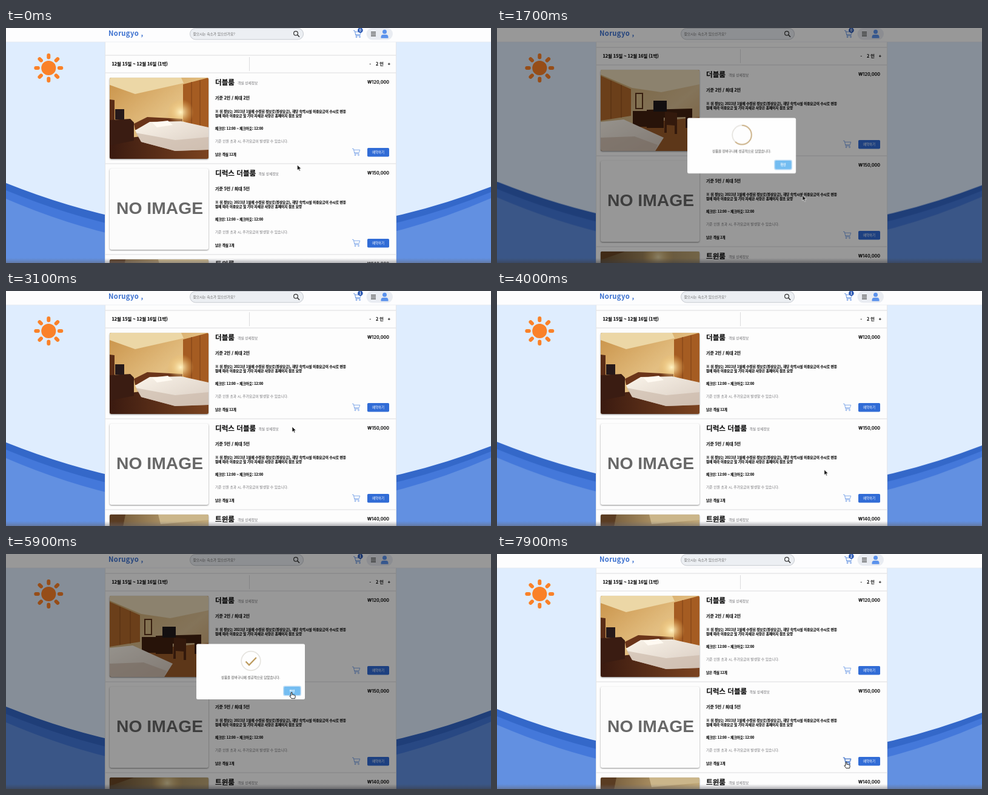
Write an HTML page that moves like this. It is 800x388 px and loops after 8000 ms.

```html
<!DOCTYPE html>
<html lang="ko">
<head>
<meta charset="utf-8">
<title>객실 예약</title>
<style>
html, body { margin: 0; width: 100%; height: 100%; overflow: hidden; background: #dfedfe; }
svg { display: block; }
#stage { width: 800px; height: 388px; font-family: "Noto Sans CJK KR", "Noto Sans CJK", "Noto Sans", sans-serif; }
text { white-space: pre; }
.b { font-weight: 700; }
.m { font-weight: 500; }
.heavy { font-weight: 700; stroke: #151515; stroke-width: .2px; }
.price { font-family: Inter, "Noto Sans CJK KR", sans-serif; font-weight: 700; text-anchor: end; }
.mid { text-anchor: middle; }
.line { stroke: #dcdcde; fill: none; }
.shadow { filter: drop-shadow(0 1px 1px rgba(0,0,0,.45)); }

.waves, .scroll, .second, .hover, .dim, .modal, .ring, .tick, .cursor, .arrow, .hand, .n0, .n1, .n2 {
  animation: 8s linear infinite;
}
.waves { animation-name: waves; animation-timing-function: ease-in-out; }
@keyframes waves { 0%, 100% { transform: translateY(4px); } 52% { transform: translateY(-3px); } }

.scroll { animation-name: scroll; }
@keyframes scroll {
  0%, 2% { transform: translateY(13px); animation-timing-function: ease-out; }
  6%, 100% { transform: translateY(0); }
}
.second { animation-name: second; }
@keyframes second {
  0%, 3.75% { opacity: 0; } 8%, 28.75% { opacity: 1; }
  33%, 53.75% { opacity: 0; } 58%, 77% { opacity: 1; } 81%, 100% { opacity: 0; }
}
.hover { animation-name: hover; animation-timing-function: step-end; }
@keyframes hover {
  0% { opacity: 0; } 12.5% { opacity: 1; } 18% { opacity: 0; }
  53% { opacity: 1; } 63.5% { opacity: 0; } 94.5%, 100% { opacity: 1; }
}
.dim { animation-name: dim; }
@keyframes dim {
  0%, 17.5% { opacity: 0; } 20%, 31.25% { opacity: 1; } 33.75%, 62.5% { opacity: 0; }
  65%, 76.9% { opacity: 1; } 79.4%, 100% { opacity: 0; }
}
.modal { animation-name: modal; transform-origin: 404px 194px; }
@keyframes modal {
  0%, 17.5% { transform: scale(.5); } 19.5% { transform: scale(1.04); } 20.5%, 31.25% { transform: scale(1); }
  33.75%, 62.5% { transform: scale(.5); } 64.5% { transform: scale(1.04); } 65.5%, 76.9% { transform: scale(1); }
  79.4%, 100% { transform: scale(.5); }
}
.ring { stroke-dasharray: 100; animation-name: ring; }
@keyframes ring {
  0%, 18.4% { stroke-dashoffset: 100; opacity: 1; } 23% { stroke-dashoffset: 0; opacity: 1; }
  27%, 40% { stroke-dashoffset: 0; opacity: 0; } 40.1%, 63.4% { stroke-dashoffset: 100; opacity: 1; }
  68% { stroke-dashoffset: 0; opacity: 1; } 72%, 100% { stroke-dashoffset: 0; opacity: 0; }
}
.tick { stroke-dasharray: 100 110; animation-name: tick; }
@keyframes tick {
  0%, 22.5% { stroke-dashoffset: 105; } 27.5%, 40% { stroke-dashoffset: 0; }
  40.1%, 67.5% { stroke-dashoffset: 105; } 72.5%, 100% { stroke-dashoffset: 0; }
}
.cursor { animation-name: cursor; animation-timing-function: ease-in-out; }
@keyframes cursor {
  0%, 4% { transform: translate(480.5px, 226px); }
  12.5%, 17.9% { transform: translate(577px, 342px); animation-timing-function: linear; }
  21.25% { transform: translate(504px, 276.5px); animation-timing-function: ease-out; }
  24.5%, 33% { transform: translate(471px, 228px); }
  38.75%, 45% { transform: translate(472px, 224px); }
  53.75%, 60% { transform: translate(580.5px, 337.5px); }
  64.4% { transform: translate(577px, 340px); }
  70%, 78% { transform: translate(471px, 228px); }
  83.75%, 88% { transform: translate(471px, 228.5px); }
  95%, 100% { transform: translate(576px, 343px); }
}
.arrow, .hand { animation-timing-function: step-end; }
.arrow { animation-name: arrow; }
.hand { animation-name: hand; }
@keyframes arrow {
  0% { opacity: 1; } 12.5% { opacity: 0; } 18% { opacity: 1; } 24.4% { opacity: 0; } 33% { opacity: 1; }
  60.6% { opacity: 0; } 65% { opacity: 1; } 69.5% { opacity: 0; } 78% { opacity: 1; } 94.5%, 100% { opacity: 0; }
}
@keyframes hand {
  0% { opacity: 0; } 12.5% { opacity: 1; } 18% { opacity: 0; } 24.4% { opacity: 1; } 33% { opacity: 0; }
  60.6% { opacity: 1; } 65% { opacity: 0; } 69.5% { opacity: 1; } 78% { opacity: 0; } 94.5%, 100% { opacity: 1; }
}
.n0, .n1, .n2 { animation-timing-function: step-end; }
.n0 { animation-name: n0; }
.n1 { animation-name: n1; }
.n2 { animation-name: n2; }
@keyframes n0 { 0% { opacity: 1; } 32%, 100% { opacity: 0; } }
@keyframes n1 { 0% { opacity: 0; } 32% { opacity: 1; } 78%, 100% { opacity: 0; } }
@keyframes n2 { 0% { opacity: 0; } 78%, 100% { opacity: 1; } }
</style>
</head>
<body>
<svg id="stage" viewBox="0 0 800 388">
  <defs>
    <linearGradient id="wall" x2="1" y2="1"><stop stop-color="#c99248"/><stop offset=".5" stop-color="#e3bf82"/><stop offset="1" stop-color="#cf9f5c"/></linearGradient>
    <linearGradient id="pale" x2="1" y2="1"><stop stop-color="#c9a366"/><stop offset=".6" stop-color="#dcc195"/><stop offset="1" stop-color="#c79a63"/></linearGradient>
    <linearGradient id="floor" x2="1"><stop stop-color="#3a1a10"/><stop offset="1" stop-color="#7b4320"/></linearGradient>
    <linearGradient id="sheet" x2="1" y2="1"><stop stop-color="#faf4ea"/><stop offset="1" stop-color="#d8cbc0"/></linearGradient>
    <linearGradient id="dusk" x2="1"><stop stop-color="#6b5234"/><stop offset=".5" stop-color="#a48a5e"/><stop offset="1" stop-color="#c0a878"/></linearGradient>
    <linearGradient id="foot" x2="0" y2="1"><stop stop-color="#707078" stop-opacity="0"/><stop offset="1" stop-color="#606068" stop-opacity=".5"/></linearGradient>
    <radialGradient id="glow"><stop stop-color="#fff3c4"/><stop offset="1" stop-color="#f0b95c" stop-opacity="0"/></radialGradient>
    <clipPath id="card"><rect width="163" height="134" rx="3"/></clipPath>

    <symbol id="cart" viewBox="0 0 14 13" overflow="visible">
      <path d="M.5 .8H2.6L4.6 9H12M3.1 2.8H13.2L11.8 7.2H4.2" fill="none" stroke="currentColor" stroke-width=".85" stroke-linejoin="round"/>
      <circle cx="5.6" cy="11.2" r="1" fill="none" stroke="currentColor" stroke-width=".8"/><circle cx="11" cy="11.2" r="1" fill="none" stroke="currentColor" stroke-width=".8"/>
    </symbol>

    <g id="bedroom">
      <path d="M0 0H163V134H0Z" fill="url(#wall)"/>
      <path d="M0 0H118L122 9L42 27L0 12Z" fill="#ecd7a6"/>
      <path d="M121 11L163 0V88L121 72Z" fill="#a55c22"/>
      <path d="M135 7V77M149 4V82" stroke="#7d3f14"/>
      <path d="M0 103L60 96L163 112V134H0Z" fill="url(#floor)"/>
      <path d="M0 36L8 37V75H0Z" fill="#5b2d16"/>
      <path d="M0 70L34 68L40 74V104L0 112Z" fill="#3a1c12"/>
      <path d="M9 52H24V69H9Z" fill="#26191a"/>
      <path d="M40 76L62 65L120 68V86H42Z" fill="#6a3419"/>
      <circle cx="117" cy="57" r="22" fill="url(#glow)"/>
      <path d="M42 87L66 73L118 72L163 82V119L108 121L52 106Z" fill="url(#sheet)"/>
      <path d="M70 74L96 71L104 78L78 82Z" fill="#fffaf2"/>
      <path d="M43 91L108 103L163 98V119L108 121L52 106Z" fill="#cbb9aa" opacity=".65"/>
    </g>
    <g id="study">
      <path d="M0 0H163V134H0Z" fill="url(#pale)"/>
      <path d="M0 0H163V24L100 37L52 30L0 8Z" fill="#e9d9b8"/>
      <path d="M0 10L50 32V76L0 84Z" fill="#b26a2c"/>
      <path d="M17 18V81M34 25V79" stroke="#8a4a1b"/>
      <path d="M46 90L163 78V134H46Z" fill="#9c5c2b"/>
      <path d="M58 39H69V64H58Z" fill="#d9bd88" stroke="#5d321a" stroke-width="2"/>
      <path d="M53 68H78V94H53ZM76 66L151 64V96H140V78L104 79V96H76Z" fill="#42200f"/>
      <path d="M87 51H109V69H87Z" fill="#211a1b"/>
      <path d="M106 69L126 71V106H122V92L109 91V104H105Z" fill="#552a15"/>
      <path d="M0 86L38 82L104 112L90 134H0Z" fill="url(#sheet)"/>
      <path d="M0 112L56 110L94 124L90 134H0Z" fill="#c9b4a4" opacity=".65"/>
    </g>
    <g id="twinA"><path d="M0 0H163V134H0Z" fill="url(#dusk)"/><path d="M0 0H26L20 30H0Z" fill="#5a3c22"/><path d="M80 0H163V9L84 16Z" fill="#cbb68a"/></g>
    <g id="twinB"><path d="M0 0H163V134H0Z" fill="url(#dusk)"/><path d="M0 0H40L0 14Z" fill="#6b4726"/><circle cx="95" cy="9" r="26" fill="url(#glow)" opacity=".7"/></g>
  </defs>

  <path d="M0 0H800V388H0Z" fill="#dfedfe"/>
  <g class="waves">
    <path d="M0 252Q400 412 800 258V410H0Z" fill="#3468c9"/>
    <path d="M0 264Q400 429 800 267V410H0Z" fill="#4478da"/>
    <path d="M0 278Q400 450 800 277V410H0Z" fill="#6290e1"/>
  </g>
  <g id="sun" fill="#fa8128"><circle cx="70.3" cy="66" r="12.1"/></g>

  <path d="M163.5 0H643.5V389H163.5Z" fill="#fdfdfd" stroke="#e3e6ea"/>
  <g class="scroll">
    <path class="line" d="M164 32H643M164 61H643M401.5 35V58"/>
    <text class="heavy" x="174.5" y="49.2" font-size="7.3">12월 15일 ~ 12월 16일 (1박)</text>
    <text class="heavy" x="599.5" y="48.5" font-size="7">-</text>
    <text class="b" x="610" y="48.5" font-size="7.2">2 인</text>
    <text class="heavy" x="629.7" y="48.5" font-size="7">+</text>
    <g id="rooms"></g>
  </g>

  <path d="M0 0H800V23H0Z" fill="#fdfdfe"/>
  <path d="M0 23H800" stroke="#e6e9ee" stroke-width=".7"/>
  <text class="b" x="169" y="13" font-size="11.3" letter-spacing=".3" fill="#3b70cf">Norugyo ,</text>
  <rect x="303.5" y=".5" width="187" height="18.5" rx="9.2" fill="#eceff3" stroke="#b9bdc5" stroke-width=".8"/>
  <text x="308.5" y="11.7" font-size="5.75" fill="#666">찾으시는 숙소가 있으신가요?</text>
  <g fill="none" stroke="#333"><circle cx="478" cy="8.7" r="3.4" stroke-width="1.2"/><path d="M480.6 11.3L484 14.7" stroke-width="1.6"/></g>
  <use href="#cart" x="572.5" y="3.5" width="14" height="13" color="#4d83dd"/>
  <circle cx="584.4" cy="3.8" r="4.3" fill="#2c59b4"/>
  <g class="b mid" font-size="5.5" fill="#fff">
    <text class="n0" x="584.4" y="5.8">0</text><text class="n1" x="584.4" y="5.8">1</text><text class="n2" x="584.4" y="5.8">2</text>
  </g>
  <rect x="594.5" y="0" width="43.5" height="19.5" rx="9.7" fill="#e9ecf2"/>
  <path d="M602 6.9H610M602 9.9H610M602 12.9H610" stroke="#333" stroke-width="1.1"/>
  <path d="M618.5 16.8V14.8Q618.5 11 622 11H627Q630.5 11 630.5 14.8V16.8Z" fill="#5b92ec"/><circle cx="624.5" cy="6.2" r="3.5" fill="#5b92ec"/>
  <path d="M0 380H800V388H0Z" fill="url(#foot)"/>

  <g class="dim">
    <path d="M0 0H800V388H0Z" opacity=".4"/>
    <g class="modal">
      <rect x="314" y="148.5" width="179" height="91.5" rx="2.5" fill="#fefefe"/>
      <g fill="none">
        <circle cx="404" cy="176.5" r="15.8" stroke="#e6e4df" stroke-width="1.7"/>
        <circle class="ring" cx="404" cy="176.5" r="15.8" pathLength="100" stroke="#c9ab7c" stroke-width="1.7" transform="rotate(-90 404 176.5)"/>
        <path class="tick" d="M395.5 177.5L401 183.3L412.8 171" pathLength="100" stroke="#bd9c60" stroke-width="2.4"/>
      </g>
      <text class="mid" x="403.5" y="205.6" font-size="5.5" fill="#444">상품을 장바구니에 성공적으로 담았습니다.</text>
      <rect x="457" y="217.5" width="30" height="17" rx="3" fill="#c3dff5"/>
      <rect x="458.5" y="219" width="27" height="14" rx="2" fill="#74bdf1"/>
      <text class="b mid" x="472" y="227.9" font-size="5" fill="#fff">확인</text>
    </g>
  </g>

  <g class="cursor" stroke-linejoin="round">
    <path class="arrow" d="M0 0V9L2.1 7.1L3.5 10.3L5 9.6L3.6 6.5H6.4Z" fill="#111" stroke="#fff" stroke-width=".7"/>
    <path class="hand" d="M-1 1Q0-.6 1 1V4.2L5 5Q6.4 5.4 6.2 7L5.6 10.6H-.2L-3 6.6Q-3 5.2-1 6.4Z" fill="#fff" stroke="#111" stroke-width=".9"/>
  </g>
</svg>
<script>
const byId = id => document.getElementById(id);

for (let i = 0; i < 8; i++) {
  byId('sun').innerHTML += `<rect x="67.3" y="42" width="6" height="9.5" rx="3" transform="rotate(${i * 45} 70.3 66)"/>`;
}

const label = (y, size, text, cls = 'heavy', fill = '#151515', x = 345) =>
  `<text class="${cls}" x="${x}" y="${y}" font-size="${size}" fill="${fill}">${text}</text>`;

const slides = (a, b) => `<g transform="translate(171 69)"><rect class="shadow" width="163" height="134" rx="3" fill="#8a6a45"/>
  <g clip-path="url(#card)"><use href="#${a}"/><use class="second" href="#${b}"/></g></g>`;

const noImage = `<rect class="shadow" x="171" y="69" width="163" height="134" rx="3" fill="#fcfcfc"/>
  <text class="b mid" x="253.5" y="144.1" font-size="28.3" fill="#686868" font-family="Liberation Sans, Arial, sans-serif">NO IMAGE</text>`;

const cart = (color, cls = '') => `<use class="${cls}" href="#cart" x="570.5" y="185.5" width="14" height="13" color="${color}"/>`;

const rooms = [
  { name: '더블룸', subX: 382, people: 2, left: 12, price: '120,000', photo: slides('bedroom', 'study') },
  { name: '디럭스 더블룸', subX: 416.5, people: 5, left: 2, price: '150,000', photo: noImage, hover: true },
  { name: '트윈룸', subX: 382, people: 3, left: 5, price: '140,000', photo: slides('twinA', 'twinB') }
];

byId('rooms').innerHTML = rooms.map((r, i) => `<g transform="translate(0 ${i * 150})">
  ${r.photo}
  ${label(81.4, 11.6, r.name)}
  ${label(80.2, 5.75, '객실 상세정보', 'm', '#6c6c70', r.subX)}
  ${label(105.2, 6.95, `기준 ${r.people}인 / 최대 ${r.people}인`)}
  ${label(127, 5.62, '※ 위 정보는 2021년 1월에 수정된 정보로(정상요금), 해당 숙박시설 이용요금이 수시로 변동')}
  ${label(134, 5.62, '됨에 따라 이용요금 및 기타 자세한 사항은 홈페이지 참조 요망')}
  ${label(155.2, 5.6, '체크인: 12:00 ~ 체크아웃: 12:00')}
  ${label(176.2, 5.77, '기준 인원 초과 시, 추가요금이 발생할 수 있습니다.', 'm', '#747478')}
  ${label(198, 5.5, `남은 객실 ${r.left}개`)}
  ${label(78.6, 7.1, '₩' + r.price, 'price', '#151515', 632)}
  ${cart('#6c9ae6')}${r.hover ? cart('#2458b8', 'hover') : ''}
  <rect x="596" y="185" width="36" height="14.5" rx="1.8" fill="#316cd6"/>
  ${label(194.2, 5.5, '예약하기', 'm mid', '#fff', 614)}
  <path class="line" d="M164 211H643"/>
</g>`).join('');
</script>
</body>
</html>
```
